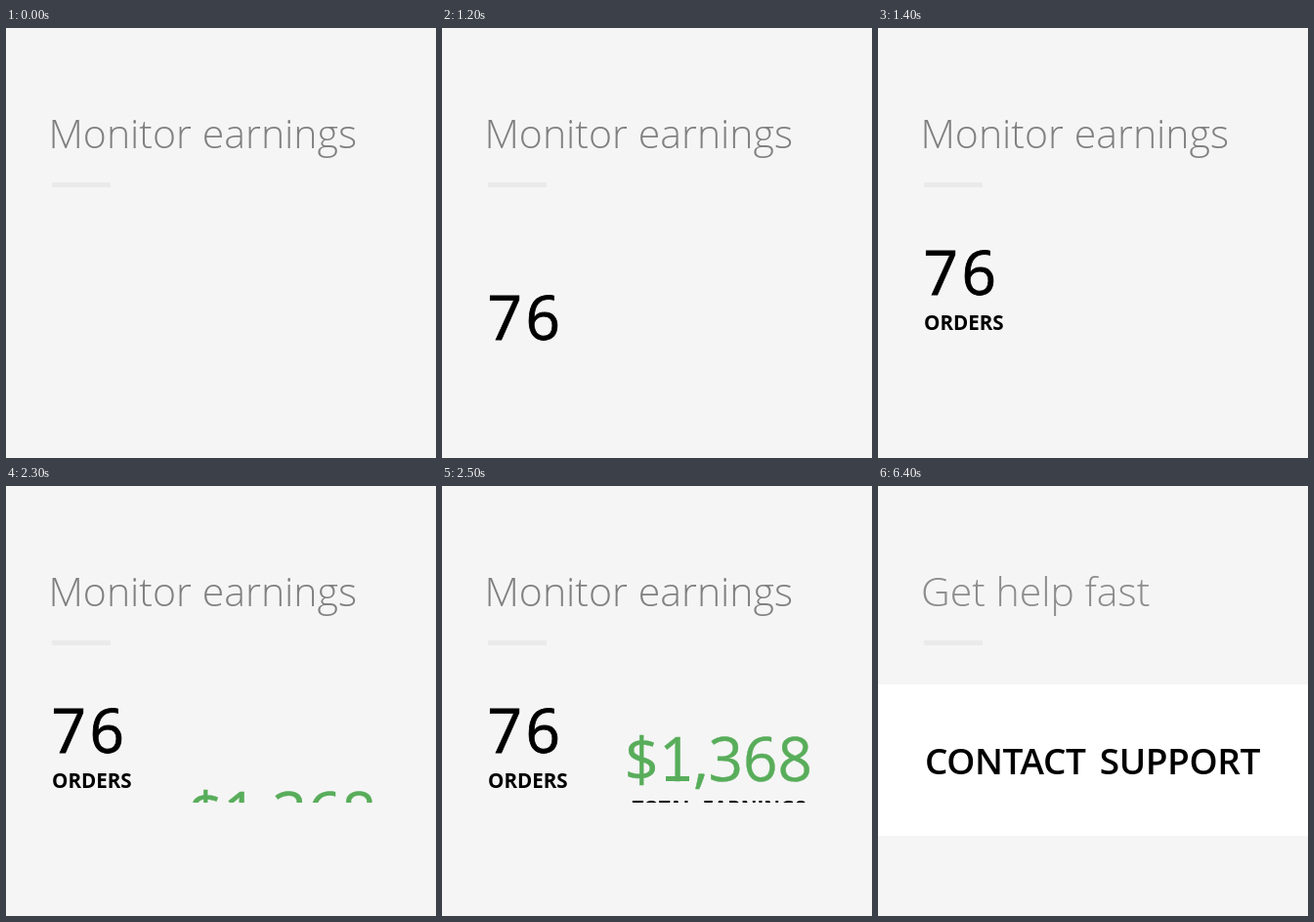
An HTML page with a canvas for the animation above (8000 ms loop, 440 by 440 pixels).

```html
<!DOCTYPE html>
<html lang="en">
<head>
<meta charset="utf-8">
<title>Monitor earnings</title>
<style>
  html, body { margin: 0; width: 100%; height: 100%; overflow: hidden; background: #f5f5f5; }
  canvas { display: block; width: 440px; height: 440px; }
</style>
</head>
<body>
<canvas id="stage" width="440" height="440"></canvas>
<script>
const ctx = document.getElementById('stage').getContext('2d');
const LOOP = 8000;
const STEP = 50;
const MASK_BOTTOM = 324;
const GREEN = '#58ad5a';
const LIGHT = '300 41px "Open Sans", sans-serif';
const FIGURE = '400 62px "Open Sans", sans-serif';
const LABEL = '700 20.6px "Open Sans", sans-serif';
const BUTTON = '600 37px "Open Sans", sans-serif';

function write(text, x, y, font, color, { spacing = 0, gap = 0, weight = 0 } = {}) {
  ctx.font = font;
  ctx.letterSpacing = spacing + 'px';
  ctx.wordSpacing = gap + 'px';
  ctx.fillStyle = ctx.strokeStyle = color;
  ctx.fillText(text, x, y);
  if (weight) {
    ctx.lineWidth = weight;
    ctx.strokeText(text, x, y);
  }
}

function box(x, y, w, h, color) {
  ctx.fillStyle = color;
  ctx.fillRect(x, y, w, h);
}

// A figure with its label rises at constant speed from behind the mask edge.
function rise(t, start, distance, speed, paint) {
  if (t < start) return;
  ctx.save();
  ctx.beginPath();
  ctx.rect(0, 0, 440, MASK_BOTTOM);
  ctx.clip();
  ctx.translate(0, Math.max(0, Math.round(distance - speed * (t - start))));
  paint();
  ctx.restore();
}

function orders() {
  write('76', 46.5, 273, FIGURE, '#000', { spacing: 3.5, weight: 0.8 });
  write('ORDERS', 47, 308.5, LABEL, '#000');
}

function earnings() {
  write('$1,368', 186.5, 274, FIGURE, GREEN, { weight: 0.4 });
  box(229, 269, 24, 5, GREEN); // foot of the 1
  write('TOTAL EARNINGS', 194.5, 308.5, LABEL, '#000', { gap: 3 });
}

function draw(t) {
  box(0, 0, 440, 440, '#f5f5f5');
  box(47, 158, 60, 5, '#eaeaea');
  if (t < 6400) {
    write('Monitor earnings', 43.5, 122.5, LIGHT, '#808080');
    rise(t, 1050, 89, 0.284, orders);
    rise(t, 2300, 84, 0.28, earnings);
  } else {
    write('Get help fast', 44, 122.5, LIGHT, '#8c8c8c');
    box(0, 203, 440, 155, '#fff');
    write('CONTACT SUPPORT', 48, 295, BUTTON, '#000', { spacing: -0.4, gap: 5 });
  }
}

const began = performance.now();

function frame() {
  const t = (performance.now() - began) % LOOP;
  draw(Math.floor(t / STEP) * STEP);
  requestAnimationFrame(frame);
}

frame();
</script>
</body>
</html>
```
